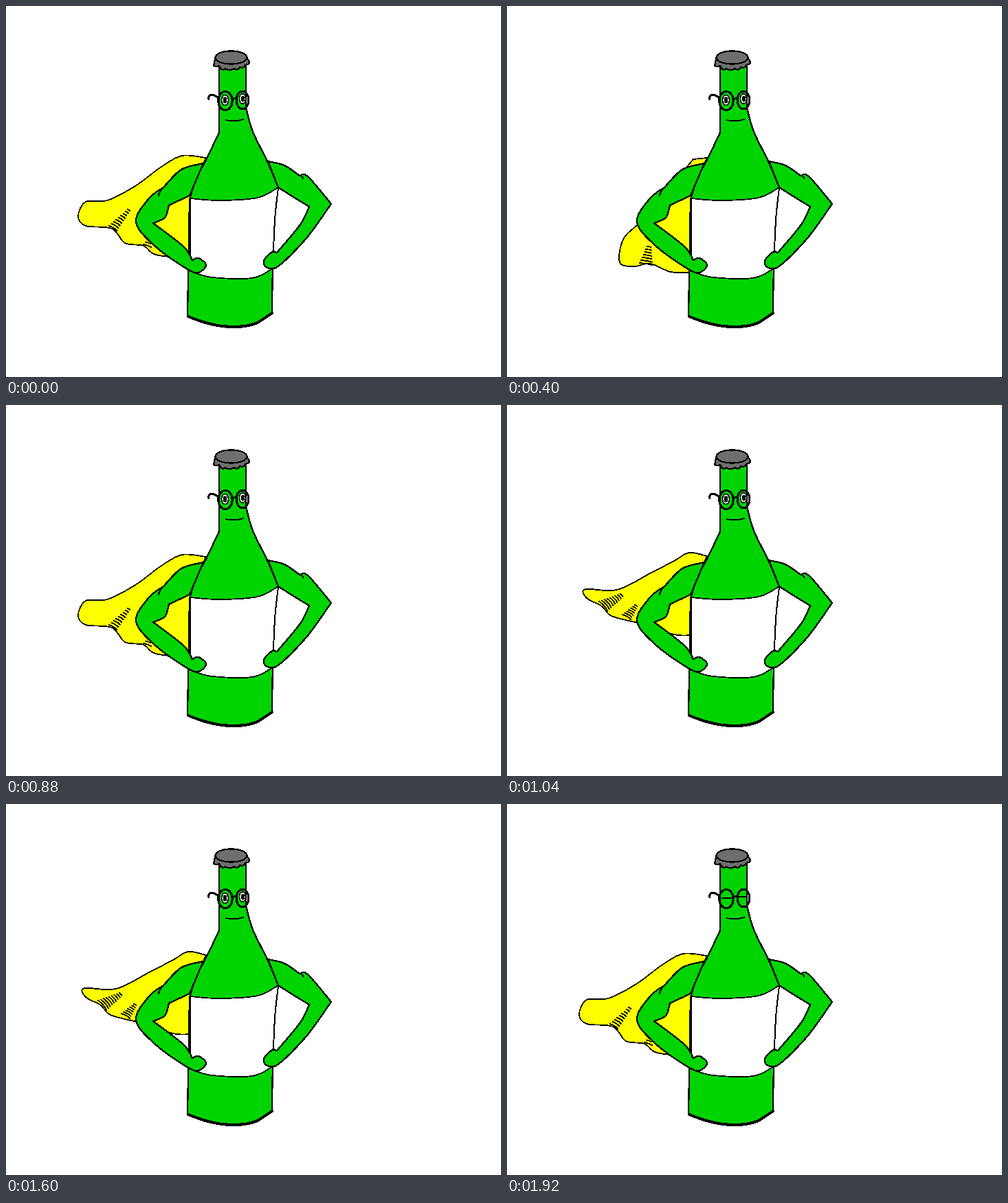
Recreate the animation shown at these times as an HTML page. Size 720x540 px, loop 2 s.

```html
<!DOCTYPE html>
<html lang="en">
<head>
<meta charset="utf-8">
<title>Caped bottle</title>
<style>
  html, body { margin: 0; width: 100%; height: 100%; overflow: hidden; background: #fff; }
  svg { display: block; width: 720px; height: 540px; shape-rendering: crispEdges; }
  path, ellipse { stroke: #000; stroke-width: 2.3; stroke-linecap: round; stroke-linejoin: round; fill: none; }
  .green { fill: #00d400; }
  .white { fill: #fff; }
  .gray { fill: #6e6e6e; }
  .ink { fill: #000; stroke: none; }
  .thin, .cape path { stroke-width: 1.8; }
  .bold { stroke-width: 3; }
  .base { stroke-width: 4; }
  .cape .cloth { fill: #ff0; }
  .cape, .eyes, .lids { animation: 2s step-end infinite; }
  .cape, .lids { visibility: hidden; }
  .mid { animation-name: mid; }
  .low { animation-name: low; }
  .rise { animation-name: rise; }
  .high { animation-name: high; }
  .eyes { animation-name: open; }
  .lids { animation-name: shut; }
  @keyframes mid { 0%, 32%, 96%, 100% { visibility: visible; } 16%, 48% { visibility: hidden; } }
  @keyframes low { 0%, 32%, 100% { visibility: hidden; } 16% { visibility: visible; } }
  @keyframes rise { 0%, 64%, 96%, 100% { visibility: hidden; } 48%, 80% { visibility: visible; } }
  @keyframes high { 0%, 80%, 100% { visibility: hidden; } 64% { visibility: visible; } }
  @keyframes open { 0% { visibility: visible; } 96%, 100% { visibility: hidden; } }
  @keyframes shut { 0% { visibility: hidden; } 96%, 100% { visibility: visible; } }
</style>
</head>
<body>
<svg viewBox="0 0 720 540">
  <g class="cape mid">
    <path class="cloth" data-curve="291,221 256,218 226,234 188,262 147,283 116,285 105,306 116,320 154,324 173,345 200,349 218,362 268,368 / 268,270"/>
    <path data-hatch="150,320 177,296 11,7" data-count="9"/>
    <path data-hatch="200,347 206,340 11,4" data-count="3"/>
  </g>
  <g class="cape low">
    <path class="cloth" data-curve="291,221 271,223 / 200,308 170,338 164,373 185,379 208,375 238,387 268,388 / 268,270"/>
    <path data-hatch="193,374 204,350 18,3" data-count="7"/>
  </g>
  <g class="cape rise">
    <path class="cloth" data-curve="291,220 265,215 243,227 210,244 160,269 114,268 116,281 138,293 152,307 190,317 / 243,334 268,335 / 268,270"/>
    <path data-hatch="134,286 165,275 12,14" data-count="9"/>
    <path data-hatch="168,305 186,291 12,7" data-count="7"/>
  </g>
  <g class="cape high">
    <path class="cloth" data-curve="293,219 225,226 186,227 150,236 107,231 / 113,246 133,262 152,288 195,299 268,298 / 268,270"/>
    <path data-hatch="139,260 169,253 9,13" data-count="8"/>
    <path data-hatch="188,295 201,281 9,4" data-count="5"/>
  </g>

  <path class="green" data-curve="310,88 / 310,184 / 290,226 278,248 267,281 / 264,452 / 300,464 357,464 387,447 / 388,382 391,310 396,264 / 380,226 359,183 349,148 / 349,88"/>
  <path class="white thin" data-curve="268,280 310,283 366,279 396,264 / 391,310 388,382 / 358,396 300,395 268,386"/>
  <path class="base" d="M265 452Q326 477 366 461L387 447"/>

  <path class="green" data-curve="287,229 255,238 229,264 / 208,280 189,314 215,348 262,382 280,388 291,377 280,367 271,370 / 258,350 214,316 / 231,308 237,290 / 267,276"/>
  <path class="green" data-curve="381,226 405,232 427,247 / 439,248 473,288 / 437,338 397,378 380,381 375,371 387,358 394,359 / 428,318 441,292 / 418,278 396,264"/>
  <path d="M229 264q-6 5-7 12M427 247q4 0 5 4"/>

  <path class="gray" d="M304 77L302 87q5 2 8 0q4 9 9 4q7 5 12 0q6 4 9-2q5 3 8-3q6-1 6-5L350 75z"/>
  <ellipse class="gray" cx="327.5" cy="75" rx="23" ry="9.5"/>

  <g class="eyes">
    <ellipse class="white thin" cx="318.5" cy="137" rx="5" ry="7.5"/>
    <ellipse class="ink" cx="318.5" cy="137" rx="2.8" ry="4.7"/>
    <ellipse class="white thin" cx="344" cy="135" rx="4.6" ry="7.2"/>
    <ellipse class="ink" cx="344.5" cy="135" rx="2.6" ry="4.5"/>
  </g>
  <path class="lids" d="M313 137h13M338 135h11"/>
  <ellipse class="bold" cx="319" cy="138" rx="10.2" ry="13.7"/>
  <ellipse class="bold" cx="344" cy="137" rx="9" ry="13"/>
  <path class="bold" d="M329 136q3-2 6-1M309 134Q305 130 299 129Q294 130 295 136"/>
  <path class="thin" d="M320 166Q333 169 345 165"/>
</svg>
<script>
  const points = text => text.split(' ').map(p => p.split(',').map(Number));

  // Closed outline, smooth through the points; "/" makes the point before it a corner.
  function curve(text) {
    const [first, ...rest] = text.split(' / ').map(points);
    let d = 'M' + first[0];
    let last = first[0];
    for (const run of [first.slice(1), ...rest]) {
      const pts = [last, ...run];
      for (let i = 0; i < pts.length - 1; i++) {
        const a = pts[i - 1] || pts[i], b = pts[i], c = pts[i + 1], e = pts[i + 2] || c;
        const near = b.map((v, k) => v + (c[k] - a[k]) / 6);
        const far = c.map((v, k) => v - (e[k] - b[k]) / 6);
        d += `C${near} ${far} ${c}`;
      }
      last = pts[pts.length - 1];
    }
    return d + 'Z';
  }

  // Bent strokes in a row from one point to another, each shorter than the one before.
  function hatch(text, count) {
    const [from, to, stroke] = points(text);
    let d = '';
    for (let i = 0; i < count; i++) {
      const t = i / (count - 1);
      const start = from.map((v, k) => v + (to[k] - v) * t);
      const [dx, dy] = stroke.map(v => v * (1 - 0.7 * t));
      d += `M${start}q${dx * 0.7} ${dy * 0.4} ${dx} ${dy}`;
    }
    return d;
  }

  for (const path of document.querySelectorAll('path')) {
    const { curve: outline, hatch: row, count } = path.dataset;
    if (outline) path.setAttribute('d', curve(outline));
    if (row) path.setAttribute('d', hatch(row, count));
  }
</script>
</body>
</html>
```
